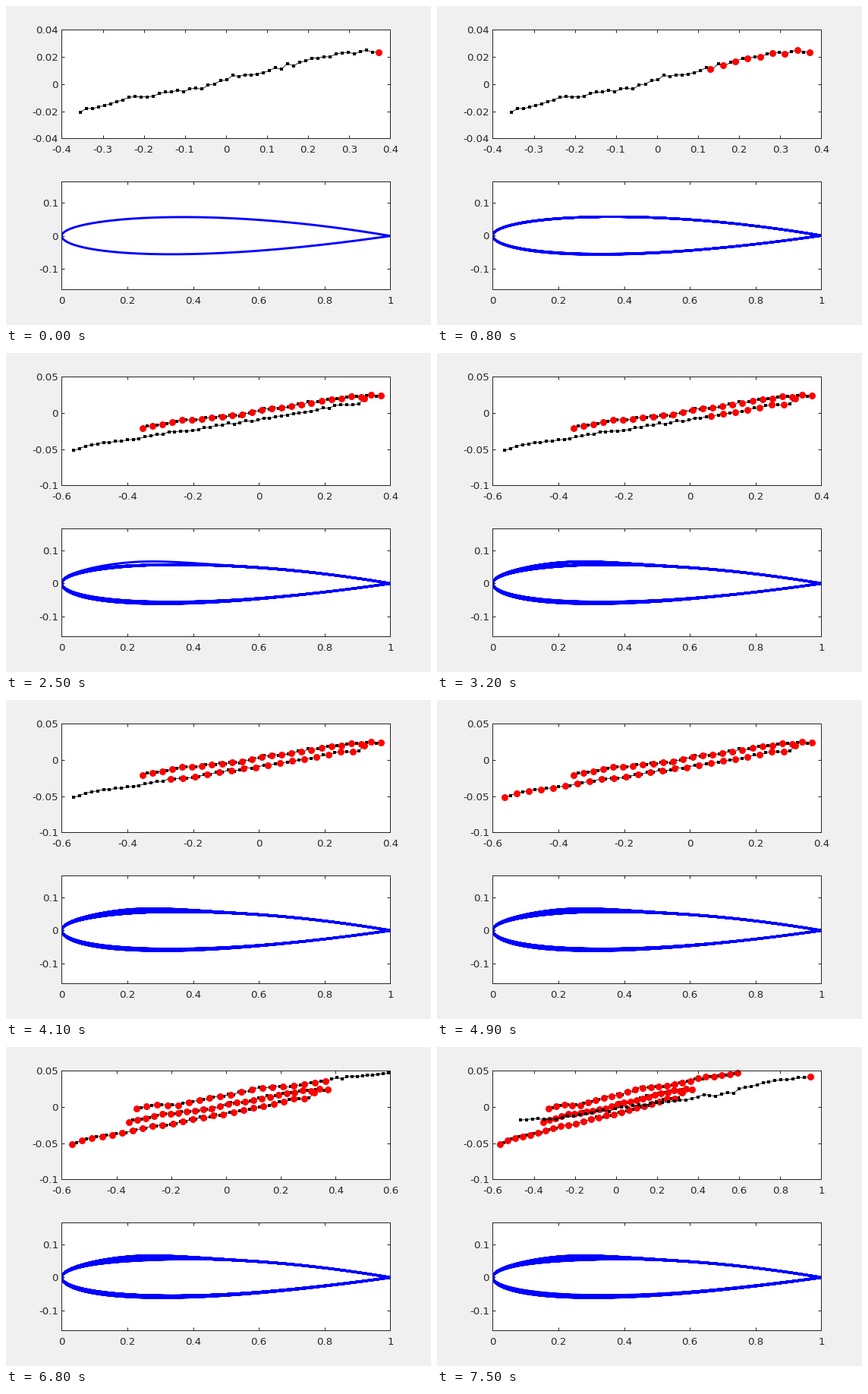
A matplotlib script for the animation above (8000 ms loop, 560 by 420 pixels).

```python
import numpy as np
import matplotlib.pyplot as plt
from matplotlib.animation import FuncAnimation

W, H, DPI = 560, 420, 100
PT = 72 / DPI                 # points per pixel
INK = "#262626"
POINTS, DOTS = 50, 25         # samples and red dots per sweep
LAST = 3 * DOTS               # the step that opens the fourth sweep

plt.rcParams.update({
    "font.family": "DejaVu Sans",
    "font.size": 13.33 * PT,
    "axes.unicode_minus": False,
    "axes.linewidth": PT,
    "axes.edgecolor": INK,
})

rng = np.random.default_rng(4)
index = np.arange(POINTS)


def sweep(x0, x1, *keys):
    """Noisy trend through (index, thousandths) keys, evenly spaced in x."""
    noise = rng.normal(0, .8, POINTS)
    noise[[0, -1]] = 0
    y = np.interp(index, *zip(*keys)) + noise
    return np.linspace(x0, x1, POINTS), y / 1000


sweeps = [
    sweep(.372, -.3547, (0, 23.7), (6, 23.5), (10, 19), (20, 8), (25, 4.5),
          (28, -1.2), (36, -7.5), (42, -11), (49, -20.8)),
    sweep(.3217, -.563, (0, 20), (1, 12.2), (4, 11.5), (10, .7), (15, -5),
          (20, -12), (28, -21.3), (46, -44), (49, -51.7)),
    sweep(-.328, .592, (0, -2.4), (4, 3), (8, 3), (16, 14.5), (25, 26.5),
          (31, 28.5), (37, 38), (49, 46.9)),
    sweep(.947, -.465, (0, 42.2), (7, 35.3), (12, 25), (13, 19), (18, 16),
          (22, 8.6), (30, 1.8), (43, -16), (49, -18)),
]

# nose, crown, belly and tail weights at the start and end of each sweep
shapes = [
    ((0, 0, 0, 0), (1, 0, 1, 0)),
    ((.6, 1, .8, 0), (.6, .35, -.05, 0)),
    ((.2, -.25, -.1, 0), (.9, .5, .4, 1)),
    ((.3, -.2, -.25, .5), (.3, -.2, -.25, .5)),
]

chord = (1 - np.cos(np.linspace(0, np.pi, 70))) / 2
foil_x = np.concatenate([chord[::-1], chord[1:], [np.nan]])


def foil(nose, crown, belly, tail):
    x = chord
    base = np.sqrt(x) * (1 - x)
    top = (.137 + .034 * x + nose * (.034 * (1 - x) ** 5 - .004)
           + crown * .03 * np.exp(-((x - .22) / .2) ** 2))
    low = (.145 - tail * .014 * x ** 2
           + belly * (.016 * np.exp(-(x / .65) ** 3) + .02 * (1 - x) ** 6))
    return np.concatenate([(base * top)[::-1], -(base * low)[1:], [np.nan]])


def foil_at(step):
    k, i = divmod(step, DOTS)
    a, b = map(np.array, shapes[k])
    return foil(*(a + (b - a) * i / (DOTS - 1)))


foils = np.array([foil_at(s) for s in range(LAST + 1)])
highs = np.maximum.accumulate(np.nanmax(foils, axis=1))
lows = np.minimum.accumulate(np.nanmin(foils, axis=1))

fig = plt.figure(figsize=(W / DPI, H / DPI), dpi=DPI, facecolor="#f0f0f0")


def panel(left, top, right, bottom):
    ax = fig.add_axes([left / W, 1 - bottom / H,
                       (right - left) / W, (bottom - top) / H])
    ax.tick_params(direction="in", top=True, right=True, length=4.3 * PT,
                   width=PT, color=INK, labelcolor=INK)
    ax.tick_params(axis="x", pad=8.6 * PT)
    ax.tick_params(axis="y", pad=4.5 * PT)
    return ax


def set_ticks(axis, lo, hi, step):
    """Ticks at every multiple of step, from just below lo to just above hi."""
    first, last = int(np.floor(lo / step)), int(np.ceil(hi / step))
    ticks = [round(i * step, 4) for i in range(first, last + 1)]
    axis.set_ticks(ticks, [f"{t:g}" for t in ticks])
    return ticks[0], ticks[-1]


upper = panel(73.4, 31.4, 506.4, 174.4)
lower = panel(73.4, 231.4, 506.4, 373.4)
set_ticks(lower.xaxis, 0, 1, .2)
set_ticks(lower.yaxis, -.1, .1, .1)
lower.set_xlim(0, 1)
HALF = 142 / 433 / 2          # equal scale on both axes

trails, dots = [], []
for _ in sweeps:
    trails += upper.plot([], [], "ks-", lw=.8 * PT, ms=3.5 * PT, mew=0)
    dots += upper.plot([], [], "ro", ms=9 * PT, mew=0, clip_on=False)
outline, = lower.plot([], [], "b-", lw=2.9 * PT)


def update(n):
    step = min(n, LAST)
    k, i = divmod(step, DOTS)
    x, y = np.hstack(sweeps[:k + 1])
    upper.set_xlim(set_ticks(upper.xaxis, x.min(), x.max(), .2 if k else .1))
    upper.set_ylim(set_ticks(upper.yaxis, y.min(), y.max(), .05 if k else .02))

    for j, (x, y) in enumerate(sweeps):
        shown = DOTS if j < k else i + 1 if j == k else 0
        at = np.linspace(0, POINTS - 1, DOTS)[:shown]
        trails[j].set_data(x, y)
        trails[j].set_visible(j <= k)
        dots[j].set_data(np.interp(at, index, x), np.interp(at, index, y))

    outline.set_data(np.tile(foil_x, step + 1), foils[:step + 1].ravel())
    mid = (highs[step] + lows[step]) / 2
    lower.set_ylim(mid - HALF, mid + HALF)
    return [*trails, *dots, outline]


anim = FuncAnimation(fig, update, frames=80, interval=100, repeat=True,
                     repeat_delay=0, blit=False)
plt.show()
```
